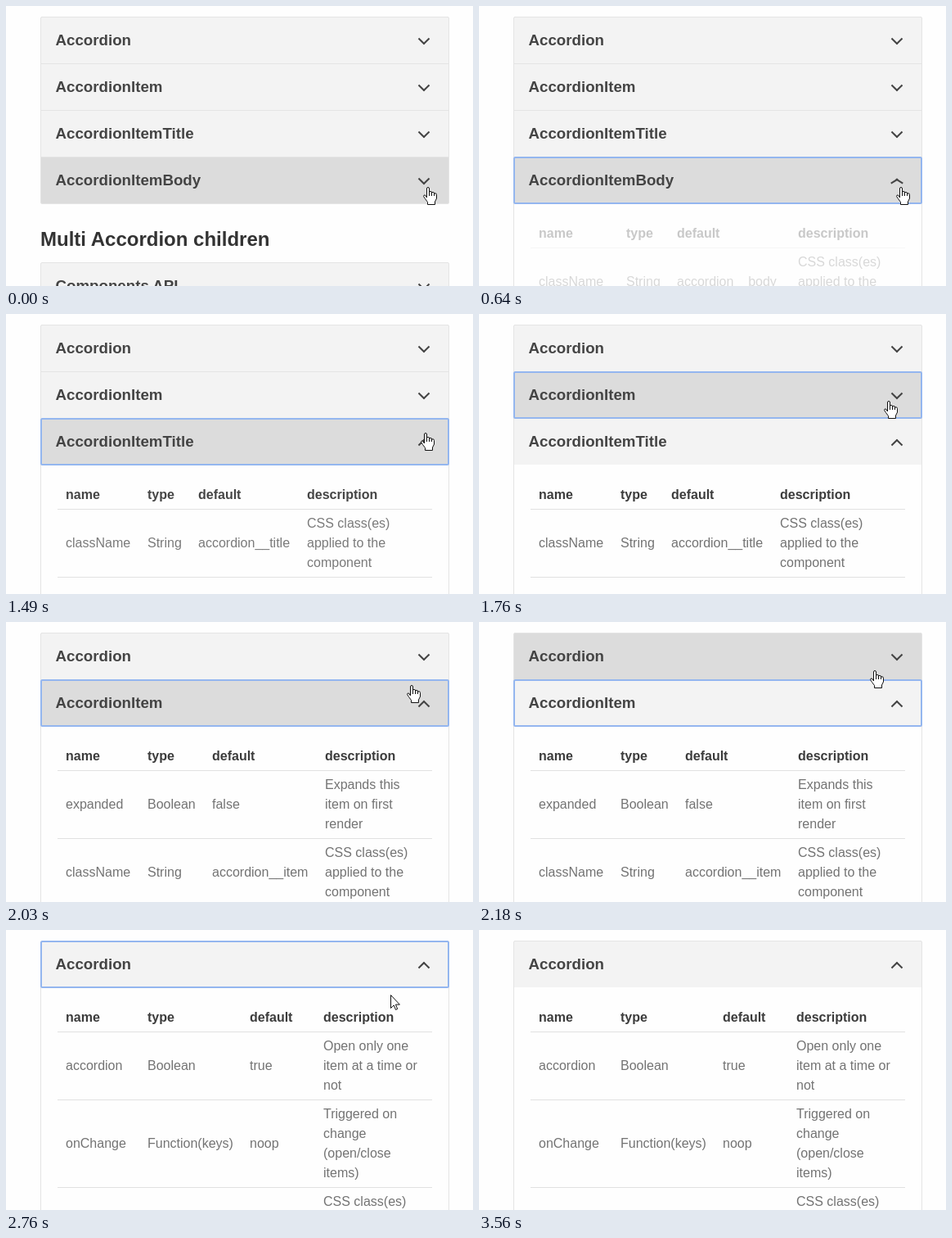
Animation of 571x342 px, one loop 3660 ms. Source, as an HTML page:

```html
<!DOCTYPE html>
<html lang="en">
<head>
<meta charset="utf-8">
<title>Accordion</title>
<style>
  html, body { margin: 0; width: 100%; height: 100%; overflow: hidden; background: #fefefe; }
  svg { display: block; font: 16px "Liberation Sans", Arial, sans-serif; fill: #737373; }
  .title { font-weight: bold; font-size: 18.72px; fill: #444; }
  .heading { font-weight: bold; font-size: 24px; fill: #333; }
  .th { font-weight: bold; fill: #3c3c3c; }
  .cursor { fill: #fff; stroke: #111; stroke-linejoin: round; }
</style>
</head>
<body>
<svg id="stage" width="571" height="342" viewBox="0 0 571 342"></svg>
<script>
const LOOP = 3660, TOP = 13, STEP = 57;
const BORDER = '#e4e4e4', PLAIN = '#f3f3f3', HOVER = '#dcdcdc', FOCUS = '#94b6ef';

const css = name => ['className', 'String', name, 'CSS class(es)|applied to the|component'];
const items = [
  { title: 'Accordion', cols: [73, 173, 298, 388], rows: [
    ['accordion', 'Boolean', 'true', 'Open only one|item at a time or|not'],
    ['onChange', 'Function(keys)', 'noop', 'Triggered on|change|(open/close|items)'],
    css('accordion')] },
  { title: 'AccordionItem', cols: [73, 173, 252, 390], rows: [
    ['expanded', 'Boolean', 'false', 'Expands this|item on first|render'],
    css('accordion__item')] },
  { title: 'AccordionItemTitle', cols: [73, 173, 235, 368], rows: [css('accordion__title')] },
  { title: 'AccordionItemBody', cols: [73, 180, 242, 390], rows: [css('accordion__body')] }
];

// Each entry changes only the listed parts of the state at its time.
const start = { focus: -1, hover: 3, open: -1, fade: 0, turn: 0, cursor: 'hand', at: [510, 221] };
const timeline = [
  [0, {}],
  [380, { focus: 3 }],
  [520, { open: 3, fade: .05, turn: .25 }],
  [640, { fade: .27, turn: .85 }],
  [790, { fade: .8, turn: 1, at: [510, 205] }],
  [920, { fade: 1, at: [510, 184] }],
  [1070, { hover: 2, at: [510, 168] }],
  [1220, { focus: 2 }],
  [1340, { open: 2, fade: .6, turn: .75 }],
  [1490, { fade: .95, turn: 1, at: [507, 145] }],
  [1620, { hover: 1, fade: 1, at: [495, 106] }],
  [1760, { focus: 1 }],
  [1890, { open: 1, fade: .6, turn: .75 }],
  [2030, { fade: 1, turn: 1, at: [490, 77] }],
  [2180, { hover: 0, at: [478, 59] }],
  [2340, { focus: 0 }],
  [2470, { open: 0, fade: .6, turn: .75 }],
  [2610, { fade: 1, turn: 1 }],
  [2760, { hover: -1, cursor: 'arrow', at: [470, 79] }],
  [2890, { at: [469, 93] }],
  [3040, { at: [492, 180] }],
  [3160, { at: [523, 288] }],
  [3280, { cursor: '' }],
  [3560, { focus: -1 }]
];
let last = start;
const states = timeline.map(([time, change]) => last = { ...last, ...change, time });

const rect = (x, y, w, h, fill) => `<rect x="${x}" y="${y}" width="${w}" height="${h}" fill="${fill}"/>`;
const frame = (x, y, w, h, color, line) =>
  `<rect x="${x + line / 2}" y="${y + line / 2}" width="${w - line}" height="${h - line}" rx="1.5"
    fill="none" stroke="${color}" stroke-width="${line}"/>`;
const text = (x, y, str, cls = '') => `<text x="${x}" y="${y}" class="${cls}">${str}</text>`;

function chevron(cy, turn) {
  const angle = 45 - 90 * turn;
  const arm = (cx, a) =>
    `<rect x="${cx - 5}" y="${cy - 1}" width="10" height="2" fill="#444" transform="rotate(${a} ${cx} ${cy})"/>`;
  return arm(508, angle) + arm(514, -angle);
}

const header = (y, title, hovered, turn) =>
  rect(43, y + 1, 498, 56, hovered ? HOVER : PLAIN) +
  text(60.5, y + 35, title, 'title') + chevron(y + 30, turn);

function table({ cols, rows }, y, fade) {
  let line = y + 111;
  let out = ['name', 'type', 'default', 'description']
    .map((name, i) => text(cols[i], y + 99, name, 'th')).join('');
  for (const row of rows) {
    const count = row[3].split('|').length;
    out += rect(63, line, 458, 1, '#e1e1e1');
    row.forEach((cell, c) => cell.split('|').forEach((part, i) =>
      out += text(cols[c], line + 23 + (c < 3 ? 12 * (count - 1) : 24 * i), part)));
    line += 24 * count + 11;
  }
  return `<g opacity="${fade}">${out}${rect(63, line, 458, 1, '#e1e1e1')}</g>`;
}

const cursors = {
  hand: 'M4.5 13V2Q4.5 .5 6 .5T7.5 2V6Q9 4.8 10.5 6V7Q12 5.8 13.5 7V8Q16.5 7 16.5 9.5V14L14.5 18V21.5H5.5V18.5L2.5 14.5L.6 11.5Q.6 9.5 2.5 10ZM7.5 6V11M10.5 7V11M13.5 8V11',
  arrow: 'M.5 .5V16.5L4.2 12.9L6.5 18.4L8.7 17.4L6.4 12.1H11.4Z'
};

function draw(s) {
  const closed = s.open < 0;
  let out = '';
  items.slice(0, closed ? 4 : s.open + 1).forEach((item, i) => {
    const y = TOP + STEP * i, open = i === s.open;
    out += rect(43, y, 498, 1, BORDER) + header(y, item.title, i === s.hover, open ? s.turn : 0);
    if (open) out += table(item, y, s.fade);
  });
  out += frame(42, TOP, 500, closed ? 229 : 400, BORDER, 1);
  if (closed) {
    out += text(42, 293, 'Multi Accordion children', 'heading') +
      header(313, 'Components API', false, 0) + frame(42, 313, 500, 80, BORDER, 1);
  }
  if (s.focus >= 0) out += frame(42, TOP + STEP * s.focus, 500, 58, FOCUS, 2);
  if (s.cursor) out += `<path class="cursor" transform="translate(${s.at})" d="${cursors[s.cursor]}"/>`;
  stage.innerHTML = out;
}

const stage = document.getElementById('stage');
let shown;
function tick() {
  const t = performance.now() % LOOP;
  const state = states.findLast(s => s.time <= t);
  if (state !== shown) draw(shown = state);
  requestAnimationFrame(tick);
}
tick();
</script>
</body>
</html>
```
